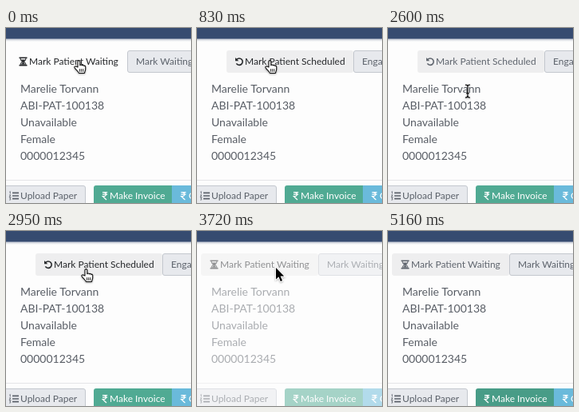
These frames come from a looping animation (232x219 px, 5380 ms). An HTML page:

```html
<!DOCTYPE html>
<html lang="en">
<head>
<meta charset="utf-8">
<title>Patient card</title>
<style>
  html, body { margin: 0; width: 100%; height: 100%; overflow: hidden; background: #fdfdfd; }
  svg { display: block; width: 100%; height: 100%; }
  text { font-family: Lato, "Open Sans", sans-serif; font-size: 12px; fill: #5c626b; }
  .info text { font-size: 14px; fill: #585d65; }
  .plain { fill: #e7e9ed; stroke: #c3c7ce; }
  .light text { fill: #fff; }
  .light use { stroke: #fff; }
  .glyph { fill: none; stroke: currentColor; }
  .action text { fill: currentColor; }
</style>
</head>
<body>
<svg viewBox="0 0 232 219" xmlns="http://www.w3.org/2000/svg">
  <defs>
    <linearGradient id="shade" x2="0" y2="1">
      <stop offset="0" stop-color="#b9c0cd"/>
      <stop offset="1" stop-color="#fdfdfd"/>
    </linearGradient>
    <filter id="drop" x="-50%" y="-50%" width="200%" height="200%">
      <feDropShadow dx="0" dy="1" stdDeviation="0.9" flood-opacity="0.35"/>
    </filter>
    <path id="rupee" d="M0 .7H6.2M0 3.2H6.2M0 .7H1.6C5.2 .7 5.2 5.7 1.6 5.7H.4L5 10" fill="none" stroke-width="1.3"/>
  </defs>

  <rect width="232" height="219" fill="#fdfdfd"/>
  <rect y="13" width="232" height="4" fill="url(#shade)"/>
  <rect width="232" height="13.5" fill="#364b70"/>

  <g id="page">
    <g id="waiting">
      <rect class="plain" x="152.5" y="28.5" width="94" height="27" rx="2.5"/>
      <text x="163" y="46">Mark Waiting</text>
      <rect class="back" x="5" y="28" width="147" height="28" rx="3" fill="#eeeeef"/>
      <g class="action">
        <path d="M16.5 36.5h10v1.6h-10zM16.5 46h10v1.6h-10z" fill="currentColor"/>
        <path class="glyph" d="M18 38c0 2.6 2 3 2.7 4-.7 1-2.7 1.600-2.700 4M25 38c0 2.600-2 3-2.700 4 .7 1 2.700 1.600 2.700 4" stroke-width="1.100"/>
        <path d="M19 39.500h5l-2 2.300v1.200l2.300 2.800h-5.600l2.300-2.800v-1.200z" fill="currentColor"/>
        <text x="29" y="46">Mark Patient Waiting</text>
      </g>
    </g>

    <g id="scheduled">
      <rect class="plain" x="196.500" y="28.500" width="60" height="27" rx="2.500"/>
      <text x="207" y="46">Engage</text>
      <rect class="back" x="37" y="28" width="159" height="28" rx="3" fill="#eeeeef"/>
      <g class="action">
        <path class="glyph" d="M49.800 39.400A4.200 4.200 0 1 1 49.400 44.400" stroke-width="1.600"/>
        <path d="M48 37v4.300h4.300z" fill="currentColor"/>
        <text x="60" y="46">Mark Patient Scheduled</text>
      </g>
    </g>

    <g class="info">
      <text x="18" y="81">Marelie Torvann</text>
      <text x="18" y="102">ABI-PAT-100138</text>
      <text x="18" y="123">Unavailable</text>
      <text x="18" y="144">Female</text>
      <text x="18" y="165">0000012345</text>
    </g>

    <rect y="190" width="232" height="1" fill="#e4e5e7"/>

    <rect class="plain" x="-6.500" y="197.500" width="106" height="28" rx="2.500"/>
    <path d="M8 206.300h8M8 210h8M8 213.700h8" stroke="#5c626b" stroke-width="1.700"/>
    <path class="glyph" color="#5c626b" d="M4.300 205.300l1-.8v3M4 209h2l-2 2.200h2.300M4 212.700h2l-1 1.200c1.700.2 1 1.700-1 1.100" stroke-width=".8"/>
    <text x="18" y="214">Upload Paper</text>

    <g class="light">
      <path id="invoice" d="M208 197h-95a3 3 0 0 0-3 3v25h98z"/>
      <rect x="208" y="197" width="30" height="28" fill="#6abadb"/>
      <use href="#rupee" x="121" y="205"/>
      <text x="130" y="214">Make Invoice</text>
      <use href="#rupee" x="219.500" y="205"/>
      <text x="229" y="214">Collect</text>
    </g>
  </g>

  <g id="cursor" filter="url(#drop)">
    <path id="arrow" d="M0 0V14.500L3.400 11.300 5.800 17 8 16 5.600 10.600H10.200Z" fill="#000" stroke="#fff" stroke-width="1.600" paint-order="stroke"/>
    <g id="hand" stroke="#111" stroke-width="1.100" stroke-linejoin="round" stroke-linecap="round">
      <path fill="#fff" d="M0 10V3a1.400 1.400 0 0 1 2.800 0V7.800c.3-1.200 2.400-1.100 2.600.2 .5-1 2.400-.7 2.500.6 .6-.8 1.800-.4 1.800 1V12.500c0 2-1 3-1.200 5H1.400C1 15.400-1.600 14-3.800 11 -4.800 9.400-3 8.200-1.600 9.300Z"/>
      <path fill="none" stroke-width=".9" d="M2.600 12.500v3M4.700 12.500v3M6.800 12.500v3"/>
    </g>
    <path id="beam" d="M-3-8q3 0 3 2V6q0 2-3 2M3-8q-3 0-3 2M0 6q0 2 3 2M-1.800 2.500h3.600" fill="none" stroke="#111" stroke-width="1.200"/>
  </g>
</svg>
<script>
const LOOP = 5380;
const $ = id => document.getElementById(id);
const show = (id, on) => $(id).style.display = on ? "" : "none";

// start, step count, step length, start point, end point, easing power
const moves = [
  [1840, 5, 57.5, [90, 39], [100, 81], 1],
  [2600, 7, 58, [100, 81], [99, 46], 1.5],
  [4500, 9, 60, [99, 46], [201, 198], 1.2],
  [5040, 3, 60, [201, 198], [201, 222], 1]
];
// time the panel empties, time it starts to come back
const reloads = [[540, 660], [3550, 3610]];

function pointer(t) {
  let pos = moves[0][3];
  for (const [start, count, step, a, b, power] of moves) {
    if (t < start) break;
    const n = Math.min(count, Math.floor((t - start) / step) + 1);
    const p = (n / count) ** power;
    pos = a.map((v, i) => v + (b[i] - v) * p);
  }
  return pos;
}

function opacity(t) {
  for (const [out, back] of reloads) {
    if (t >= out && t < back) return 0;
    if (t >= back && t < back + 172) return (Math.floor((t - back) / 57) + 1) / 4;
  }
  return 1;
}

function shape(t, x, y) {
  const loading = (t >= 600 && t < 830) || (t >= 3550 && t < 3780);
  if (loading) return "arrow";
  if (y < 55 || y >= 197) return "hand";
  return y > 66 && y < 87 && x < 118 ? "beam" : "arrow";
}

function draw(t) {
  const [x, y] = pointer(t);
  const kind = shape(t, x, y);
  const scheduled = t >= 600 && t < 3580;

  $("page").setAttribute("opacity", opacity(t));
  show("scheduled", scheduled);
  show("waiting", !scheduled);
  document.querySelector("#waiting .back").style.opacity = t < 300 ? 0 : 1;
  for (const el of document.querySelectorAll(".action"))
    el.style.color = y < 57.5 ? "#26282b" : "#5f656e";
  $("invoice").setAttribute("fill", y >= 197 ? "#489c87" : "#50aa93");

  $("cursor").setAttribute("transform", `translate(${x.toFixed(1)} ${y.toFixed(1)})`);
  for (const id of ["arrow", "hand", "beam"]) show(id, id === kind);
  show("cursor", t < 5160);
}

function tick() {
  draw(performance.now() % LOOP);
  requestAnimationFrame(tick);
}
tick();
</script>
</body>
</html>
```
